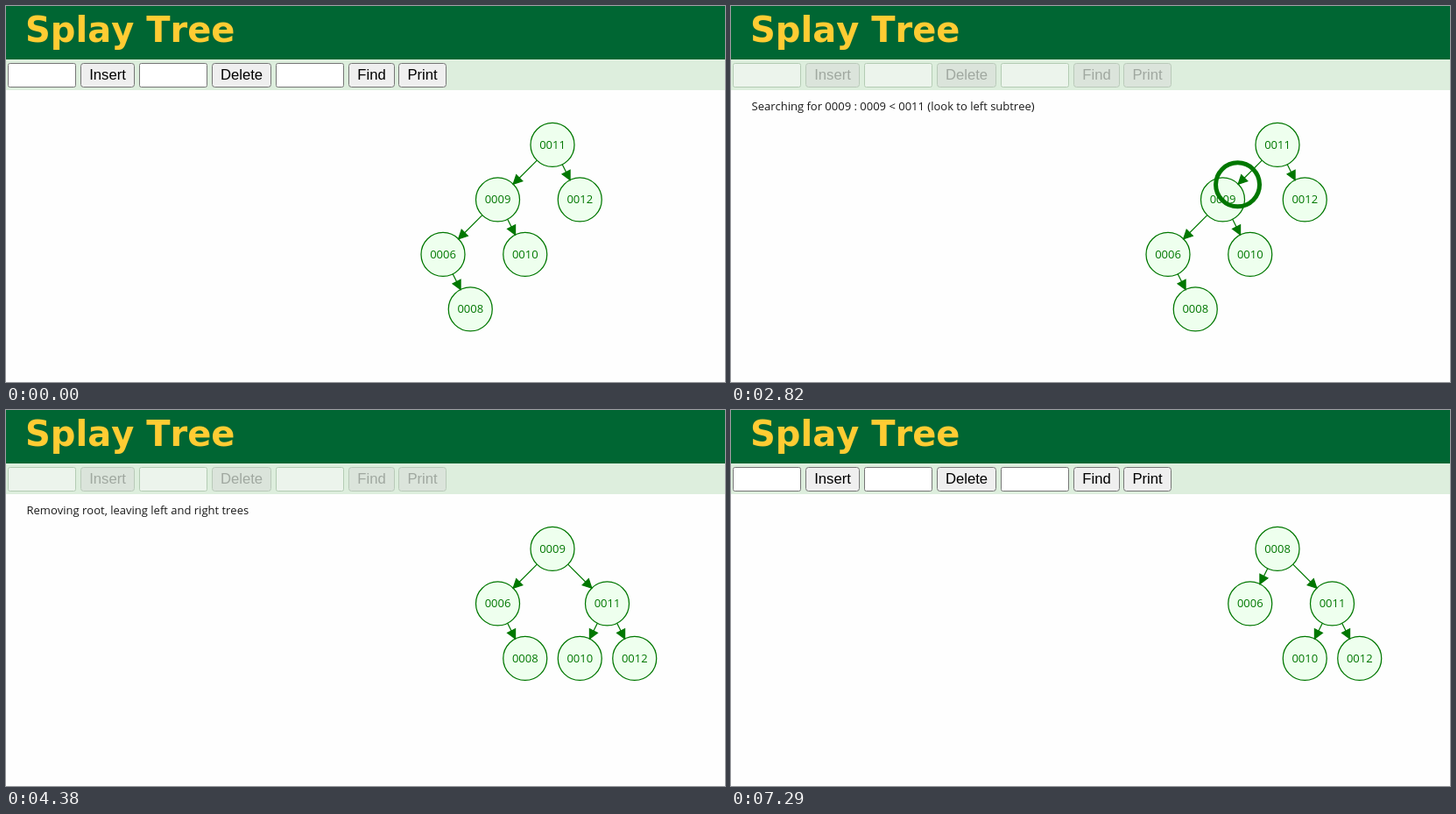
An HTML page with a canvas that plays this animation: 821 px wide and 429 px high, repeating every 7.65 s.

```html
<!DOCTYPE html>
<html lang="en">
<head>
<meta charset="utf-8">
<title>Splay Tree</title>
<style>
  html, body { margin: 0; width: 100%; height: 100%; overflow: hidden; background: #fefefe; }
  canvas { display: block; }
</style>
</head>
<body>
<canvas id="stage" width="821" height="429"></canvas>
<script>
const ctx = document.getElementById('stage').getContext('2d');
const LOOP = 7650, TICK = 30, MOVE_TICKS = 11;
const R = 25, GREEN = '#007700', RED = '#ff0000';
const LABEL_FONT = '13px "Open Sans", "Noto Sans", sans-serif';
const FORM_FONT = '16.67px "Liberation Sans", Arial, sans-serif';

// Node places as [column, row] on the tree grid
const START = { 6: [0, 2], 8: [1, 3], 9: [2, 1], 10: [3, 2], 11: [4, 0], 12: [5, 1] };
const SPLAYED = { 6: [2, 1], 8: [3, 2], 9: [4, 0], 10: [5, 2], 11: [6, 1], 12: [7, 2] };
const JOINED = { ...SPLAYED, 6: [3, 1], 8: [4, 0] };

const PHASES = [
  { from: 0, edges: [[11, 9], [11, 12], [9, 6], [9, 10], [6, 8]] },
  { from: 4020, edges: [[9, 6], [9, 11], [11, 10], [11, 12], [6, 8]] },
  { from: 4740, edges: [[11, 10], [11, 12], [6, 8]] },
  { from: 6180, edges: [[11, 10], [11, 12], [8, 6]] },
  { from: 6900, edges: [[11, 10], [11, 12], [8, 6], [8, 11]] }
];

const MESSAGES = [
  { from: 0, text: '' },
  { from: 1530, text: 'Deleting 0009' },
  { from: 1860, text: 'Finding 0009 and splaying to rooot' },
  { from: 2220, text: 'Searching for 0009 : 0009 < 0011 (look to left subtree)' },
  { from: 2940, text: 'Searching for 0009 : 0009 = 0009 (Element found!)' },
  { from: 3300, text: 'Splaying found node to root of tree' },
  { from: 3660, text: 'Zig Right' },
  { from: 4380, text: 'Removing root, leaving left and right trees' },
  { from: 4740, text: 'Splay largest element in left tree to root' },
  { from: 5820, text: 'Zig Left' },
  { from: 6540, text: 'Left tree now has no right subtree, connect left and right trees' },
  { from: 7260, text: '' }
];

const FIELDS = [2, 152, 308];
const BUTTONS = [['Insert', 85, 62], ['Delete', 235, 68], ['Find', 391, 53], ['Print', 448, 55]];

const during = (t, a, b) => t >= a && t < b;
const current = (list, t) => list.filter(item => t >= item.from).pop();
const progress = (t, from) => Math.min(1, Math.max(0, (t - from) / TICK / MOVE_TICKS));
const lerp = (a, b, p) => ({ x: a.x + (b.x - a.x) * p, y: a.y + (b.y - a.y) * p });
const place = ([col, row]) => ({ x: 499 + col * 31.25, y: 158.4 + row * 62.5 });

function write(text, x, y, font, color, align = 'left') {
  ctx.font = font;
  ctx.fillStyle = color;
  ctx.textAlign = align;
  ctx.fillText(text, x, y);
}

function disc(p, r, fill, stroke, width) {
  ctx.beginPath();
  ctx.arc(p.x, p.y, r, 0, Math.PI * 2);
  if (fill) { ctx.fillStyle = fill; ctx.fill(); }
  if (stroke) { ctx.strokeStyle = stroke; ctx.lineWidth = width; ctx.stroke(); }
}

function box(x, w, fill, stroke, radius) {
  ctx.beginPath();
  ctx.roundRect(x + 0.5, 65.5, w - 1, 27, radius);
  ctx.fillStyle = fill;
  ctx.fill();
  ctx.strokeStyle = stroke;
  ctx.lineWidth = 1;
  ctx.stroke();
}

function arrow(a, b, color, width) {
  const len = Math.hypot(b.x - a.x, b.y - a.y);
  const ux = (b.x - a.x) / len, uy = (b.y - a.y) / len;
  const tx = b.x - ux * R, ty = b.y - uy * R;
  ctx.strokeStyle = ctx.fillStyle = color;
  ctx.lineWidth = width;
  ctx.beginPath();
  ctx.moveTo(a.x + ux * R, a.y + uy * R);
  ctx.lineTo(tx, ty);
  ctx.stroke();
  ctx.beginPath();
  ctx.moveTo(tx, ty);
  ctx.lineTo(tx - ux * 10 - uy * 5, ty - uy * 10 + ux * 5);
  ctx.lineTo(tx - ux * 10 + uy * 5, ty - uy * 10 - ux * 5);
  ctx.closePath();
  ctx.stroke();
  ctx.fill();
}

function drawHeader() {
  ctx.fillStyle = '#006633';
  ctx.fillRect(0, 0, 821, 61);
  ctx.fillStyle = '#ddeedd';
  ctx.fillRect(0, 61, 821, 35);
  write('Splay Tree', 22, 41, 'bold 40px "DejaVu Sans", Verdana, sans-serif', '#ffcc33');
}

function drawControls(t) {
  const off = during(t, 1500, 7260);
  const hoverField = during(t, 540, 1500);
  const hoverButton = during(t, 480, 510);
  FIELDS.forEach((x, i) => {
    const border = i === 1 && hoverField ? '#4f4f4f' : '#767676';
    box(x, 78, off ? '#ecf4ec' : '#ffffff', off ? '#b4ccb4' : border, 2);
  });
  for (const [label, x, w] of BUTTONS) {
    const hover = label === 'Delete' && hoverButton;
    const fill = off ? '#dbe4db' : hover ? '#e5e5e5' : '#efefef';
    const border = off ? '#b9cab9' : hover ? '#4f4f4f' : '#767676';
    box(x, w, fill, border, 3);
    write(label, x + w / 2, 84, FORM_FONT, off ? '#a0a8a0' : '#000000', 'center');
  }
  if (during(t, 720, 1500)) drawTyping(t);
}

function drawTyping(t) {
  ctx.strokeStyle = '#101010';
  ctx.lineWidth = 2;
  ctx.beginPath();
  ctx.roundRect(152, 65, 78, 28, 2);
  ctx.stroke();
  const typed = t >= 1320;
  if (typed) write('9', 157.3, 84, FORM_FONT, '#000000');
  if (typed || t < 1200) {
    ctx.fillStyle = '#000000';
    ctx.fillRect(typed ? 166 : 157, 69, 1, 20);
  }
}

function layout(t) {
  const first = progress(t, 4020), second = progress(t, 6180);
  const nodes = {};
  for (const key in START) {
    const p = lerp(place(START[key]), place(SPLAYED[key]), first);
    nodes[key] = second > 0 ? lerp(p, place(JOINED[key]), second) : p;
  }
  if (t >= 4740) delete nodes[9];
  return nodes;
}

function drawNode(key, p, ring) {
  if (ring) disc(p, ring, RED);
  disc(p, R, '#eeffee', GREEN, 1.25);
  write(key.padStart(4, '0'), p.x, p.y + 4.2, LABEL_FONT, GREEN, 'center');
}

// Hollow circle that walks from a parent to its child
function drawMarker(t, nodes) {
  let p;
  if (during(t, 2580, 2940)) p = lerp(nodes[11], nodes[9], progress(t, 2580));
  else if (during(t, 5100, 5490)) p = nodes[6];
  else if (during(t, 5490, 5820)) p = lerp(nodes[6], nodes[8], progress(t, 5430));
  if (p) disc(p, R, null, GREEN, 5);
}

function drawTree(t) {
  const nodes = layout(t);
  const lit = during(t, 2220, 2580) ? '11' : during(t, 2940, 3660) ? '9' : '';
  const ring = 30.9 + (t - 2220) * 0.0017;
  for (const key in nodes) if (key !== lit) drawNode(key, nodes[key]);
  if (lit) drawNode(lit, nodes[lit], ring);
  drawMarker(t, nodes);

  const hot = during(t, 3660, 4020) ? '11,9' : during(t, 5820, 6180) ? '6,8' : '';
  const pulse = 6 + Math.abs((t / 360) % 2 - 1);
  for (const edge of current(PHASES, t).edges) {
    const [a, b] = edge.map(key => nodes[key]);
    if (String(edge) === hot) arrow(a, b, RED, pulse);
    arrow(a, b, GREEN, 1.25);
  }
}

function draw(now) {
  const t = Math.floor((now % LOOP) / TICK + 1e-6) * TICK;
  ctx.fillStyle = '#fefefe';
  ctx.fillRect(0, 0, 821, 429);
  drawHeader();
  drawControls(t);
  write(current(MESSAGES, t).text, 23.5, 118.5, LABEL_FONT, '#1a1a1a');
  drawTree(t);
}

const begin = performance.now();
function loop() {
  draw(performance.now() - begin);
  requestAnimationFrame(loop);
}
ctx.fontKerning = 'none';
loop();
</script>
</body>
</html>
```
